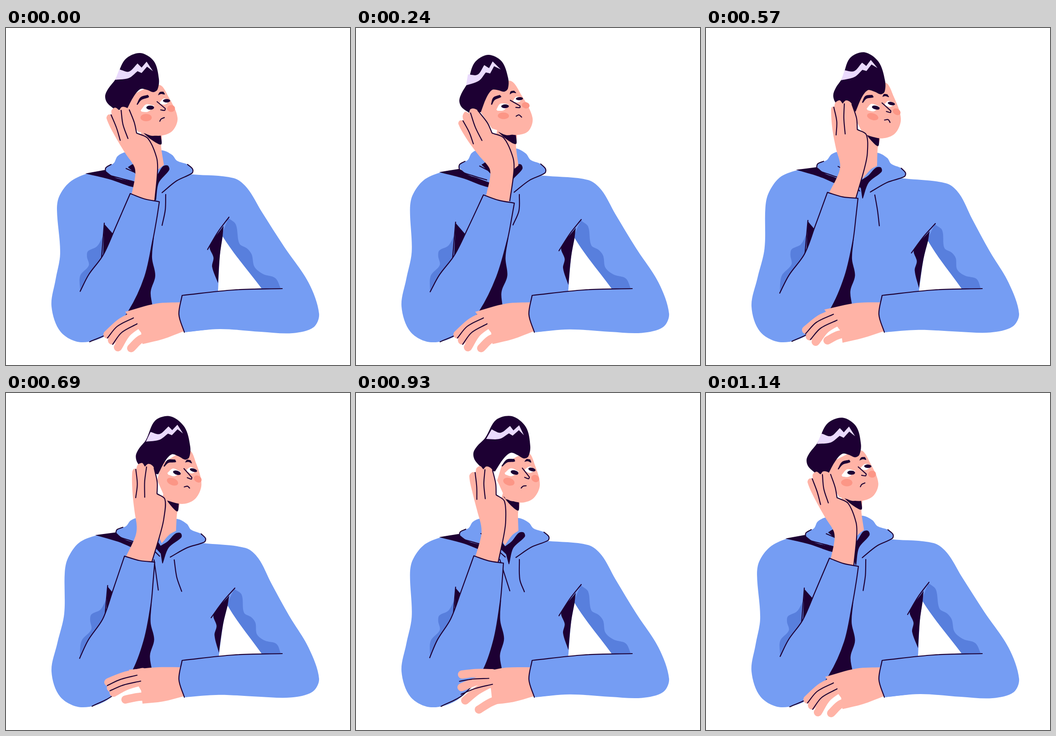
These frames come from a looping animation (756x741 px, 1.17 s). An HTML page:

```html
<!DOCTYPE html>
<html lang="en">
<head>
<meta charset="utf-8">
<title>Thinking</title>
<style>
html, body { margin: 0; height: 100%; overflow: hidden; background: #fff; }
svg { display: block; width: 100vw; height: 100vh; fill: none; stroke-linecap: round; stroke-linejoin: round; }
</style>
</head>
<body>
<svg id="stage" viewBox="0 0 756 741"></svg>
<script>
const LOOP = 1170, STEP = 30;
const BLUE = '#759df3', SHADE = '#587fdd', DARK = '#1d0033', SKIN = '#ffb3a6', BLUSH = '#fc9686', LIGHT = '#eadafd', WHITE = '#fff';
const stage = document.getElementById('stage');
const shapes = [];
const nums = text => (text.match(/-?\d+(\.\d+)?/g) || []).map(Number);

// Smooth path through knots; "/" is a corner, "|" starts a new subpath.
function curve(text) {
  return text.split('|').map(part => {
    let d = '', last;
    for (const run of part.split('/')) {
      const n = nums(run), pts = last ? [last] : [];
      for (let i = 0; i < n.length; i += 2) pts.push([n[i], n[i + 1]]);
      const dist = (a, b) => Math.hypot(a[0] - b[0], a[1] - b[1]);
      const slope = i => {
        const a = pts[Math.max(i - 1, 0)], b = pts[Math.min(i + 1, pts.length - 1)];
        const len = dist(a, pts[i]) + dist(pts[i], b);
        return [(b[0] - a[0]) / len, (b[1] - a[1]) / len];
      };
      const handle = (i, len) => pts[i].map((v, k) => (v + slope(i)[k] * len).toFixed(2)).join(' ');
      if (!last) d = 'M' + pts[0].join(' ');
      for (let i = 1; i < pts.length; i++) {
        const len = dist(pts[i - 1], pts[i]) / 3;
        d += `C${handle(i - 1, len)} ${handle(i, -len)} ${pts[i].join(' ')}`;
      }
      last = pts.at(-1);
    }
    return d;
  }).join('');
}

// Pins list a point's place in each pose; the rig bends a drawing to every pose.
function rig(rows) {
  const pins = rows.split('/').map(nums);
  const count = Math.max(...pins.map(p => p.length)) / 2;
  function bend(x, y, pose) {
    const w = pins.map(([px, py]) => 1 / ((x - px) ** 2 + (y - py) ** 2 + 1));
    const sum = f => pins.reduce((total, p, i) => total + w[i] * f(p), 0);
    const all = sum(() => 1), cx = sum(p => p[0]) / all, cy = sum(p => p[1]) / all;
    const xx = sum(p => (p[0] - cx) ** 2), yy = sum(p => (p[1] - cy) ** 2), xy = sum(p => (p[0] - cx) * (p[1] - cy));
    const det = xx * yy - xy * xy;
    const u = (yy * (x - cx) - xy * (y - cy)) / det, v = (xx * (y - cy) - xy * (x - cx)) / det;
    return [0, 1].map(axis => sum(p => (1 / all + (p[0] - cx) * u + (p[1] - cy) * v) * (p[2 * pose + axis] ?? p[axis])).toFixed(2)).join(' ');
  }
  return text => Array.from({ length: count }, (_, pose) =>
    text.replace(/(-?\d+(?:\.\d+)?) (-?\d+(?:\.\d+)?)/g, (_, x, y) => bend(+x, +y, pose)));
}

function oval(x, y, rx, ry) {
  const at = i => (x + rx * Math.cos(i * Math.PI / 6)).toFixed(1) + ' ' + (y + ry * Math.sin(i * Math.PI / 6)).toFixed(1);
  return Array.from({ length: 13 }, (_, i) => at(i)).join(' ');
}

function add(look, poses, weights = sway) {
  const el = document.createElementNS('http://www.w3.org/2000/svg', 'path');
  for (const key in look) el.setAttribute(key, look[key]);
  stage.append(el);
  const paths = poses.map(curve);
  shapes.push({ el, weights, gaps: paths[0].split(/-?\d+(?:\.\d+)?/), values: paths.map(nums) });
}
const pen = { stroke: DARK, 'stroke-width': 2.2 };
const fill = (color, poses) => add({ fill: color }, poses);
const line = poses => add(pen, poses);

// Two poses: left, right. Four: left, moving right, right, moving left.
function sway(t, count) {
  const angle = 2 * Math.PI * t / LOOP, c = Math.cos(angle), left = (1 + c) / 2, right = (1 - c) / 2;
  if (count < 3) return [left, right];
  const k = .279, s = Math.sin(angle) / Math.sqrt(1 - k * k), q = s * s;
  return [left - q * (1 + k) / 2, (q + s) / 2, right - q * (1 - k) / 2, (q - s) / 2];
}

// Finger tapping: rest, lifting, flat, fanned, rest.
function tap(t) {
  const times = [450, 570, 810, 930, 1080], w = [0, 0, 0, 0];
  const i = times.findIndex((start, n) => t >= start && t < times[n + 1]);
  if (i < 0) return [1, 0, 0, 0];
  const f = (t - times[i]) / (times[i + 1] - times[i]);
  w[i] = 1 - f;
  w[(i + 1) % 4] = f;
  return w;
}

const body = rig(`217 314 242 308 / 146 335 168 325 / 112 395 131 390 / 119 480 130 468 / 100 612 / 165 691
  / 392 669 / 387 588 / 688 628 / 665 560 / 604 573 / 562 404 585 420 / 517 340 545 352 / 410 322 437 331
  / 490 416 504 430 / 476 458 488 468 / 448 480 457 488 / 466 561 468 572 / 216 429 224 423 / 163 579 162 583`);
const hood = rig('217 313 225 306 242 304 226 311 / 409 320 415 320 436 328 422 325 / 343 269 352 265 378 275 358 275');
const neck = rig('340 236 351 234 381 241 358 239 / 347 301 357 302 376 303 357 303 / 302 230 314 229 349 227 325 228');
const face = rig('336 125 338 116 395 121 378 132 / 377 198 388 198 429 200 404 202 / 335 237 347 235 388 243 365 241');
const hair = rig('218 149 227 160 281 147 258 132 / 324 141 326 140 386 146 369 144 / 295 55 290 59 350 53 343 51');
const streak = rig('249 91 246 102 307 92 298 80 / 323 95 318 91 379 88 369 93 / 240 114 242 126 299 114 286 101');
const features = rig('308 197 324 193 367 195 336 195 / 363 177 373 170 420 185 394 188 / 312 147 316 147 367 147 348 145');
const hand = rig(`276 366 286 368 268 365 262 361 / 327 380 338 380 328 375 312 374 / 287 231 299 231 333 223 308 224
  / 262 174 258 177 315 160 293 163 / 221 199 225 211 276 180 249 183 / 331 285 345 285 354 275 329 280
  / 282 305 293 308 294 298 275 292 / 232 190 236 203 283 172 263 174`);
const forearm = rig(`163 579 163 580 162 583 162 582 / 213 500 216 500 216 497 208 497 / 273 364 280 367 266 361 259 358
  / 337 382 348 385 333 374 324 374 / 323 465 333 465 322 470 317 460 / 270 622 272 622 274 618 278 612
  / 322 612 322 612 321 610 321 610 / 184 690 185 690 189 689 187 689`);

// Torso
fill(BLUE, body('217 314 176 321 140 339 117 370 112 400 119 496 109 553 100 612 120 668 165 691 225 673 280 610 / 385 610 / 392 669 / 470 662 560 668 630 671 676 658 688 628 665 560 612 482 562 404 530 352 500 330 410 322'));
fill(WHITE, body('476 458 470 500 466 578 / 562 572 / 476 458'));
fill(SHADE, body('489 418 505 432 513 474 530 485 540 498 546 525 565 541 592 550 604 573 / 562 573 / 476 458 480 440 489 418'));
fill(DARK, body('478 435 / 448 480 456 505 453 525 466 561 / 470 500 476 458 / 478 435'));
line(body('490 416 466 448 443 487'));
fill(DARK, body('174 320 218 312 / 250 328 290 342 / 285 351 225 332 174 320'));

// Hood and neck
fill(BLUE, hood('217 313 222 305 237 297 245 282 262 273 290 271 343 269 365 279 376 292 399 300 410 310 409 320 375 336 343 364 / 281 338 / 240 329 217 313'));
add({ fill: DARK, stroke: DARK, 'stroke-width': 1.5 }, hood('269 306 280 300 292 304 / 318 338 / 332 325 345 305 355 303 358 312 335 340 329 378 / 322 355 / 283 318 / 269 306'));
fill(SKIN, neck('300 215 / 340 230 341 262 347 301 / 333 313 318 338 / 285 295 / 300 215'));
fill(DARK, neck('300 229 320 237 340 234 / 341 256 320 246 300 229'));
line(hood('231 300 219 308 222 321 250 330 281 338 | 399 300 410 310 409 319 375 336 343 362 | 264 309 282 317 | 295 340 320 362'));
line(['351 366 350 400 343 434', '359 366 358 402 345 433', '371 367 377 401 382 435', '359 366 360 410 370 437']);
line(['315 366 308 432', '320 366 315 432', '328 367 326 432', '316 366 338 435']);

// Head
fill(SKIN, face('270 150 / 336 125 358 153 377 198 365 227 335 237 290 228 / 262 185 / 270 150'));
fill(DARK, hair('240 180 222 164 218 149 225 133 241 112 262 69 295 55 325 73 336 112 333 135 324 141 310 136 296 134 281 150 265 180 / 240 180'));
fill(LIGHT, streak('249 91 270 96 289 78 / 298 87 / 309 74 / 323 95 / 310 85 / 298 99 / 289 95 / 270 110 240 114 / 249 91'));
fill(BLUSH, features(oval(308, 197, 12.5, 8) + '|' + oval(363, 177, 8.5, 7.5)));
fill(WHITE, features('296 181 308 168 326 171 / 312 184 298 184 / 296 181 | 338 163 347 155 361 159 / 350 168 339 167 / 338 163'));
fill(DARK, features(oval(317, 175, 8.5, 4.5) + '|' + oval(353, 160, 8, 3.7)));
fill(DARK, features('287 168 296 152 312 147 / 314 152 298 158 289 169 / 287 168 | 334 148 338 141 346 140 / 349 146 341 145 334 148'));
line(features('332 162 350 177 / 349 181 340 180'));
line(['338 205 341 200 348 197', '352 194 358 191 364 196', '393 203 401 202 405 208', '363 209 367 205 374 204']);

// Raised arm
const palm = '271 180 282 208 287 231 / 312 243 331 285 333 315 327 380';
fill(SKIN, hand(`276 366 284 325 282 305 262 275 238 235 221 199 224 191 232 190 / 232 181 240 175 249 181 / 254 174 262 174 ${palm} / 300 388 / 276 366`));
line(hand(`231 191 243 220 251 247 | 253 181 257 212 268 243 | ${palm}`));
fill(SHADE, body('213 458 200 480 180 491 178 503 182 522 163 545 163 579 / 213 505 / 213 458'));
fill(DARK, body('216 431 / 240 458 / 213 505 / 216 431'));
line(body('216 429 210 505'));
fill(DARK, forearm('325 460 321 505 328 545 318 580 322 612 / 262 632 / 300 480 / 325 460'));
add({ ...pen, fill: BLUE }, forearm('163 579 182 542 213 500 240 440 273 364 / 305 376 337 382 / 332 415 323 465 305 547 270 622 230 668 184 690'));

// Resting hand
const taps = [
  { tips: '223 674 233 687 246 702 275 704', bend: 14, rise: 0, crease: [284, 644], top: '262 624', gap: 670, base: 695 },
  { tips: '220 664 228 678 241 690 267 687', bend: 14, rise: -5, crease: [284, 636], top: '260 619', gap: 668, base: 692 },
  { tips: '230 608 233 619 232 628 258 661', bend: 2, rise: -18, crease: [300, 618], top: '280 598', gap: 641, base: 674 },
  { tips: '233 619 232 647 240 676 270 696', bend: 7, rise: -9, crease: [296, 634], top: '290 611', gap: 655, base: 685 }];
const bow = (x, y, tx, ty, bend) => `${x} ${y} ${(x + tx - bend) / 2} ${(y + ty) / 2 - bend / 4} ${tx} ${ty}`;
const fingers = ({ tips, bend, rise }) => [0, 1, 2, 3].map(i => {
  const n = nums(tips);
  return i < 3 ? bow(300, 625 + 10 * i + rise, n[2 * i], n[2 * i + 1], bend) : bow(330, 672 + rise / 2, n[6], n[7], bend);
}).join('|');
const creases = ({ tips, bend, crease: [x, y] }) => [0, 1].map(i => {
  const n = nums(tips).slice(2 * i), side = 2 * i - 1;
  return bow(x + 4 * side, y + 6.5 * side, (n[0] + n[2]) / 2 - 5, (n[1] + n[3]) / 2 + 1, bend);
}).join('|');
add({ fill: SKIN }, taps.map(p => `386 603 330 ${606 + p.rise / 4} ${p.top} / 297 ${p.gap} / 300 ${p.base} / 345 ${684 + p.rise / 2} 390 667 / 386 603`), tap);
add({ stroke: SKIN, 'stroke-width': 18 }, taps.map(fingers), tap);
add(pen, taps.map(creases), tap);
const sleeve = '392 669 380 630 387 588 / 500 576 607 573';
const still = () => [1];
add({ fill: BLUE }, [sleeve + ' / 640 640 / 392 669'], still);
add(pen, [sleeve], still);

function draw() {
  const t = Math.floor(performance.now() / STEP) * STEP % LOOP;
  for (const { el, weights, gaps, values } of shapes) {
    const w = weights(t, values.length);
    el.setAttribute('d', gaps.map((gap, i) => i ? values.reduce((sum, v, n) => sum + v[i - 1] * w[n], 0).toFixed(2) + gap : gap).join(''));
  }
  requestAnimationFrame(draw);
}
draw();
</script>
</body>
</html>
```
